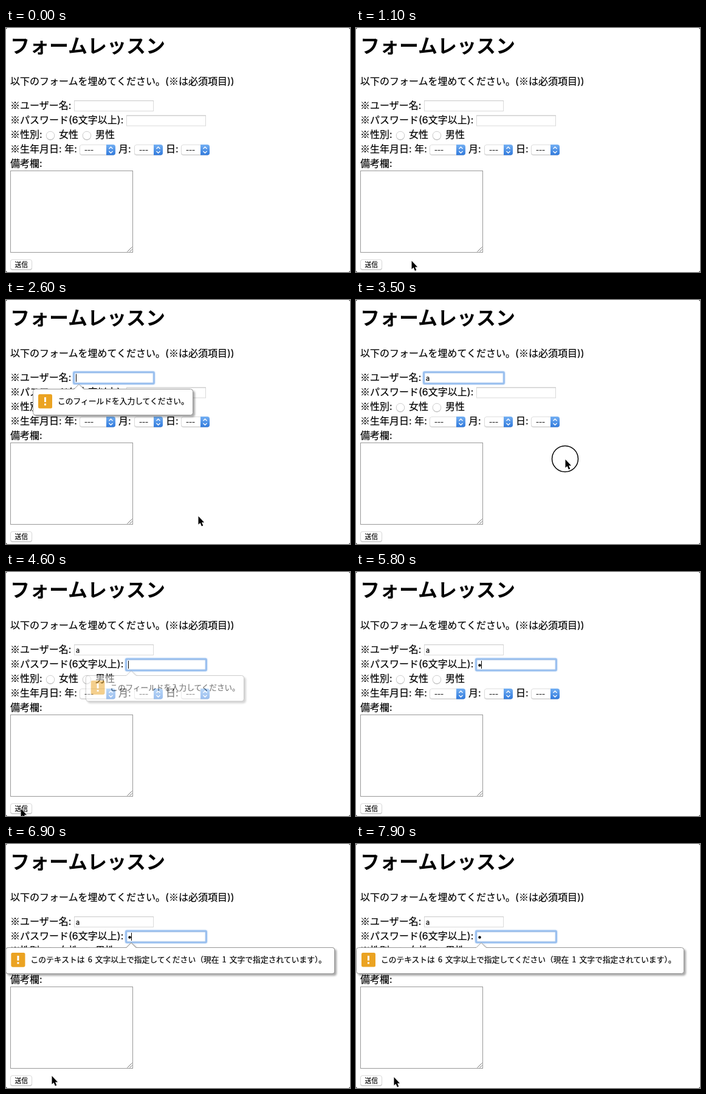
These frames come from a looping animation (566 by 404 pixels, 8 s). An HTML page:

```html
<!DOCTYPE html>
<html lang="ja">
<head>
<meta charset="utf-8">
<title>フォームレッスン</title>
<style>
  html, body { margin: 0; width: 100%; height: 100%; overflow: hidden; background: #fff; }
  svg { display: block; width: 566px; height: 404px; }
  text { font: 16px "Noto Sans CJK JP", "Noto Sans CJK", sans-serif; white-space: pre;
         fill: #000; stroke: #000; stroke-width: .2; }
  .latin { font-family: Inter, sans-serif; }
  .title { font-size: 32px; font-weight: 700; stroke: none; }
  .tip { font-size: 12.75px; word-spacing: 2.2px; }
  .button { font-size: 10.8px; }
  .value { font: 11px Inter, sans-serif; }
  .box { fill: #fff; stroke: #dadada; }
  .ring { fill: none; stroke: #98bfef; stroke-width: 2.6; filter: drop-shadow(0 0 1px #9cc2f2); }
  .bubble { fill: #fff; stroke: #959595; filter: drop-shadow(3px 3px 1.5px rgba(0, 0, 0, .33)); }
</style>
</head>
<body>
<svg viewBox="0 0 566 404">
  <defs>
    <linearGradient id="blue" x2="0" y2="1">
      <stop stop-color="#74b0f3"/><stop offset="1" stop-color="#3079dc"/>
    </linearGradient>
    <g id="field">
      <rect class="box" x=".5" y=".5" width="130" height="17"/>
      <path d="M0 .5H131" stroke="#c8c8c8"/>
    </g>
    <g id="radio">
      <circle cy=".7" r="7" fill="#bbb"/>
      <circle r="6.8" fill="#fff" stroke="#c4c4c4" stroke-width=".8"/>
    </g>
  </defs>

  <text class="title" x="7" y="41">フォームレッスン</text>
  <text x="7" y="94">以下のフォームを埋めてください。<tspan class="latin">(</tspan>※は必須項目<tspan class="latin">))</tspan></text>
  <text x="7" y="134">※ユーザー名<tspan class="latin">:</tspan></text>
  <text x="7" y="158">※パスワード<tspan class="latin">(6</tspan>文字以上<tspan class="latin">):</tspan></text>
  <text x="7" y="182">※性別<tspan class="latin">:</tspan></text>
  <text x="87" y="182">女性</text>
  <text x="147" y="182">男性</text>
  <text x="7" y="206">※生年月日<tspan class="latin">: </tspan>年<tspan class="latin">:</tspan></text>
  <text x="185" y="206">月<tspan class="latin">:</tspan></text>
  <text x="263" y="206">日<tspan class="latin">:</tspan></text>
  <text x="7" y="230">備考欄<tspan class="latin">:</tspan></text>

  <use href="#field" x="112" y="120"/>
  <use href="#field" x="198" y="144.5"/>
  <use href="#radio" x="73" y="178"/>
  <use href="#radio" x="133" y="178"/>
  <g id="selects"></g>

  <rect x="7.5" y="236.5" width="201" height="135" fill="#fff" stroke="#989898"/>
  <path d="M199.500 370.500l8-8M203.500 370.500l4-4" stroke="#777"/>

  <rect x="7" y="384" width="36" height="17" rx="4" fill="#c4c4c4"/>
  <rect x="7.400" y="383.400" width="35.200" height="16.400" rx="3.600" fill="#fff" stroke="#d4d4d4" stroke-width=".8"/>
  <text class="button" x="14.500" y="396">送信</text>

  <rect class="ring" id="nameRing" x="111.500" y="119.500" width="132" height="19" rx="1"/>
  <rect class="ring" id="passRing" x="197.500" y="144" width="132" height="19" rx="1"/>
  <text class="value" id="letter" x="115" y="133.500">a</text>
  <circle id="dot" cx="203.500" cy="154.500" r="2.200"/>
  <rect id="caret" width="1" height="13"/>

  <g id="bubbles"></g>

  <circle id="click" r="21.500" fill="none" stroke="#000" stroke-width="1.500"/>
  <path id="cursor" d="M.5 1V14.800L3.600 12L5.900 17.400L8.300 16.400L6 11.200H10.100Z"
        fill="#000" stroke="#fff" stroke-width="1" paint-order="stroke"/>
  <path d="M0 0H2L0 2ZM566 0V2L564 0ZM0 404V402L2 404ZM566 404H564L566 402Z" fill="#444"/>
</svg>
<script>
const LOOP = 8000, BLINK = 450;
const $ = id => document.getElementById(id);

// Moments of the story, in ms
const NAME_SUBMIT = 1500, NAME_TYPED = 2950;
const PASS_SUBMIT = 4550, PASS_TYPED = 5400, SHORT_SUBMIT = 6530;

// [time, x, y] of the pointer's tip
const route = [
  [400, 196, 354], [700, 154, 381], [880, 154, 381], [1320, 29, 388], [1500, 29, 388],
  [1800, 38, 390], [2000, 45, 386], [2600, 316, 357], [2880, 316, 357], [3300, 344, 263],
  [3790, 344, 263], [4330, 24, 391], [4700, 24, 391], [5300, 339, 175], [6050, 339, 175],
  [6600, 110, 358], [6900, 75, 383], [7400, 66, 387], [7900, 62, 385]
];
const shown = [[400, 3590], [3790, 5590], [6050, LOOP]];
const clicks = [[1350, 1490], [3350, 3590], [4360, 4510], [5400, 5590]];
const pop = [[0, .97], [50, .989], [150, 1.025], [250, 1.008], [450, 1]];

const bubbles = [
  { from: NAME_SUBMIT, to: NAME_TYPED, x: 44, y: 147, w: 264, tip: 120,
    text: 'このフィールドを入力してください。' },
  { from: PASS_SUBMIT, to: PASS_TYPED - 80, x: 130, y: 171, w: 264, tip: 206,
    text: 'このフィールドを入力してください。' },
  { from: SHORT_SUBMIT, to: LOOP, x: 0, y: 171, w: 540, tip: 206,
    text: 'このテキストは 6 文字以上で指定してください（現在 1 文字で指定されています）。' }
];

const within = (t, spans) => spans.some(([a, b]) => t >= a && t < b);
const show = (id, on) => $(id).setAttribute('visibility', on ? 'visible' : 'hidden');

// Value or point on a list of timed keys
function at(keys, t, ease = u => u) {
  const i = keys.findIndex(k => k[0] > t);
  if (i < 0) return keys[keys.length - 1].slice(1);
  if (i === 0) return keys[0].slice(1);
  const a = keys[i - 1], b = keys[i], u = ease((t - a[0]) / (b[0] - a[0]));
  return a.slice(1).map((v, n) => v + (b[n + 1] - v) * u);
}

function selectBox([x, w]) {
  return `<g transform="translate(${x} 193)">
    <rect y=".8" width="${w}" height="17" rx="4" fill="#c6c6c6"/>
    <rect x=".4" y=".4" width="${w - .8}" height="16.400" rx="3.600" fill="#fff" stroke="#d8d8d8" stroke-width=".8"/>
    <path d="M${w - 15} 0h11q4 0 4 4v9.500q0 4-4 4h-11z" fill="url(#blue)"/>
    <path d="M${w - 10.500} 7l3-3 3 3m-6 4l3 3 3-3" fill="none" stroke="#fff" stroke-width="1.400"/>
    <text class="value" x="8" y="13">---</text></g>`;
}

function bubble({ x, y, w, tip, text }) {
  const l = x + .5, r = x + w - .5, t = y + .5, b = y + 43.5;
  return `<g><path class="bubble" d="M${l + 4} ${t}H${tip - 8}L${tip} ${t - 8}L${tip + 8} ${t}H${r - 4}
      Q${r} ${t} ${r} ${t + 4}V${b - 4}Q${r} ${b} ${r - 4} ${b}H${l + 4}Q${l} ${b} ${l} ${b - 4}V${t + 4}Q${l} ${t} ${l + 4} ${t}Z"/>
    <rect x="${x + 9}" y="${y + 9}" width="23" height="23.500" rx="2.500" fill="#eba322"/>
    <path d="M${x + 20.5} ${y + 14}v8m0 2.500v3" stroke="#fff" stroke-width="3"/>
    <text class="tip" x="${x + 41}" y="${y + 25.3}">${text}</text></g>`;
}

$('selects').innerHTML = [[121, 59], [211, 47], [288, 47]].map(selectBox).join('');
$('bubbles').innerHTML = bubbles.map(bubble).join('');

function drawBubble(node, { from, to, tip, y }, t) {
  const fadeIn = (t - from) / 100, fadeOut = to === LOOP ? 1 : 1 - (t - to) / 150;
  const alpha = Math.max(0, Math.min(1, fadeIn, fadeOut));
  const [s] = at(pop, t - from), top = y - 8;
  node.setAttribute('opacity', alpha);
  node.setAttribute('transform', `translate(${tip} ${top}) scale(${s}) translate(${-tip} ${-top})`);
}

function drawCaret(t) {
  const start = [SHORT_SUBMIT, PASS_TYPED, PASS_SUBMIT, NAME_TYPED, NAME_SUBMIT].find(s => t >= s);
  show('caret', start !== undefined && Math.floor((t - start) / BLINK) % 2 === 0);
  const inPass = t >= PASS_SUBMIT;
  const x = inPass ? (t >= PASS_TYPED ? 206 : 201) : (t >= NAME_TYPED ? 122 : 115);
  $('caret').setAttribute('x', x);
  $('caret').setAttribute('y', inPass ? 147 : 122.5);
}

function draw(now) {
  const t = now % LOOP;
  show('nameRing', t >= NAME_SUBMIT && t < PASS_SUBMIT);
  show('passRing', t >= PASS_SUBMIT);
  show('letter', t >= NAME_TYPED);
  show('dot', t >= PASS_TYPED);
  drawCaret(t);
  bubbles.forEach((b, i) => drawBubble($('bubbles').children[i], b, t));

  const place = `translate(${at(route, t, u => u * u * (3 - 2 * u))})`;
  for (const id of ['cursor', 'click']) $(id).setAttribute('transform', place);
  show('cursor', within(t, shown));
  show('click', within(t, clicks));
}

const begin = performance.now();
function tick() {
  draw(performance.now() - begin);
  requestAnimationFrame(tick);
}
tick();
</script>
</body>
</html>
```
